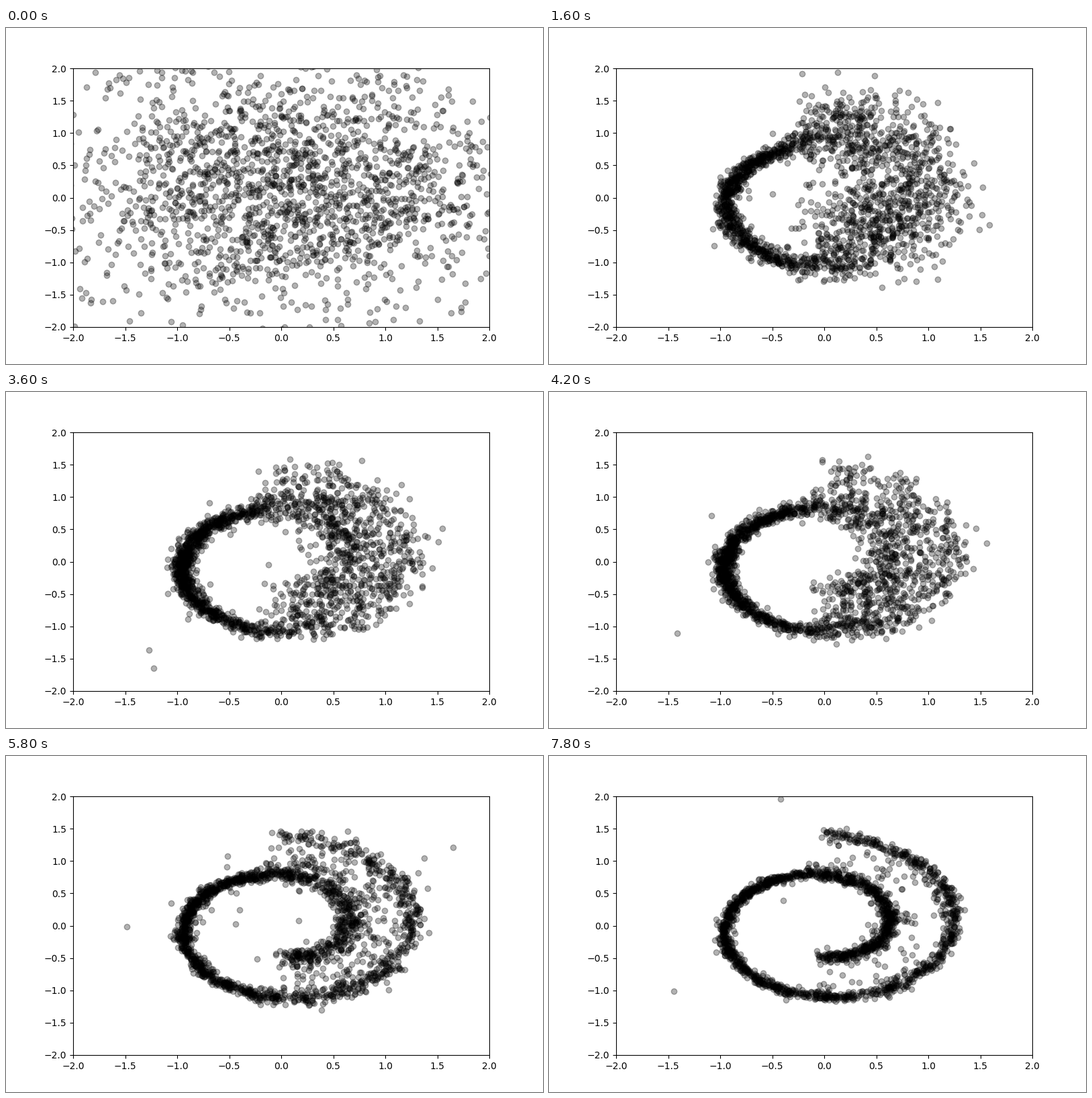
These frames come from a looping animation (800 px wide and 500 px high, 8 s). A matplotlib script:

```python
import numpy as np
import matplotlib.pyplot as plt
from matplotlib.animation import FuncAnimation

FRAMES, STEP = 40, 200
COUNT = 2000
GAP = 0.2 * np.pi  # distance between neighbouring turns
WARM_UP = 8        # steps until the spiral shape has formed


def smooth(x):
    x = np.clip(x, 0, 1)
    return x * x * (3 - 2 * x)


def sample(i):
    """Points drawn from the model after training step i."""
    rng = np.random.default_rng(100 + i)
    q = i / (FRAMES - 1)
    early = (1 - q) ** 3

    # spiral parameter, crowded on the left side halfway through training
    crowd = 0.15 + 0.4 * np.sin(np.pi * q) ** 2
    u = rng.random(COUNT)
    u = u + crowd * np.sin(2 * np.pi * u) / (2 * np.pi)
    t = 1.5 * np.pi * (1 + 2 * u)
    inner = smooth((2.7 * np.pi - t) / (0.35 * np.pi))
    outer = smooth((t - 3.35 * np.pi) / (0.4 * np.pi))
    loose = inner + outer

    # the right-hand arms leak into each other, and early on into the middle
    leak = GAP * rng.random(COUNT) ** (1 + 24 * q ** 4)
    r = t / 10 + (inner - outer) * leak
    r = r - 0.9 * early * inner * rng.random(COUNT)
    r = r * (1 + 0.015 * np.sin(t + rng.uniform(0, 2 * np.pi)))
    lift = 0.5 * early * loose * np.maximum(np.sin(t), 0)
    pts = np.column_stack((r * np.cos(t), r * np.sin(t) + lift))

    tube = 0.03 + 0.03 * (1 - q)
    blur = 0.04 + 0.25 * (1 - q) ** 1.8
    sigma = tube + (blur - tube) * loose
    sigma = sigma * np.where(rng.random(COUNT) < 0.1, 1.8, 1.0)
    sigma = np.where(rng.random(COUNT) < 0.008 * q, 0.8, sigma)
    pts += sigma[:, None] * rng.normal(size=(COUNT, 2))

    # untrained noise fades out over the first steps
    noise = rng.normal((0.08, 0.14), (1.08, 0.98), (COUNT, 2))
    fade = max(0, 1 - i / WARM_UP) ** 2
    return (1 - fade) * pts + fade * noise


fig, ax = plt.subplots(figsize=(8, 5), dpi=100)
ax.set_xlim(-2, 2)
ax.set_ylim(-2, 2)
dots, = ax.plot([], [], "ko", alpha=0.3)


def draw(i):
    dots.set_data(*sample(i).T)
    return dots,


anim = FuncAnimation(fig, draw, frames=FRAMES, init_func=lambda: draw(0),
                     interval=STEP, repeat=True, repeat_delay=0)
plt.show()
```
